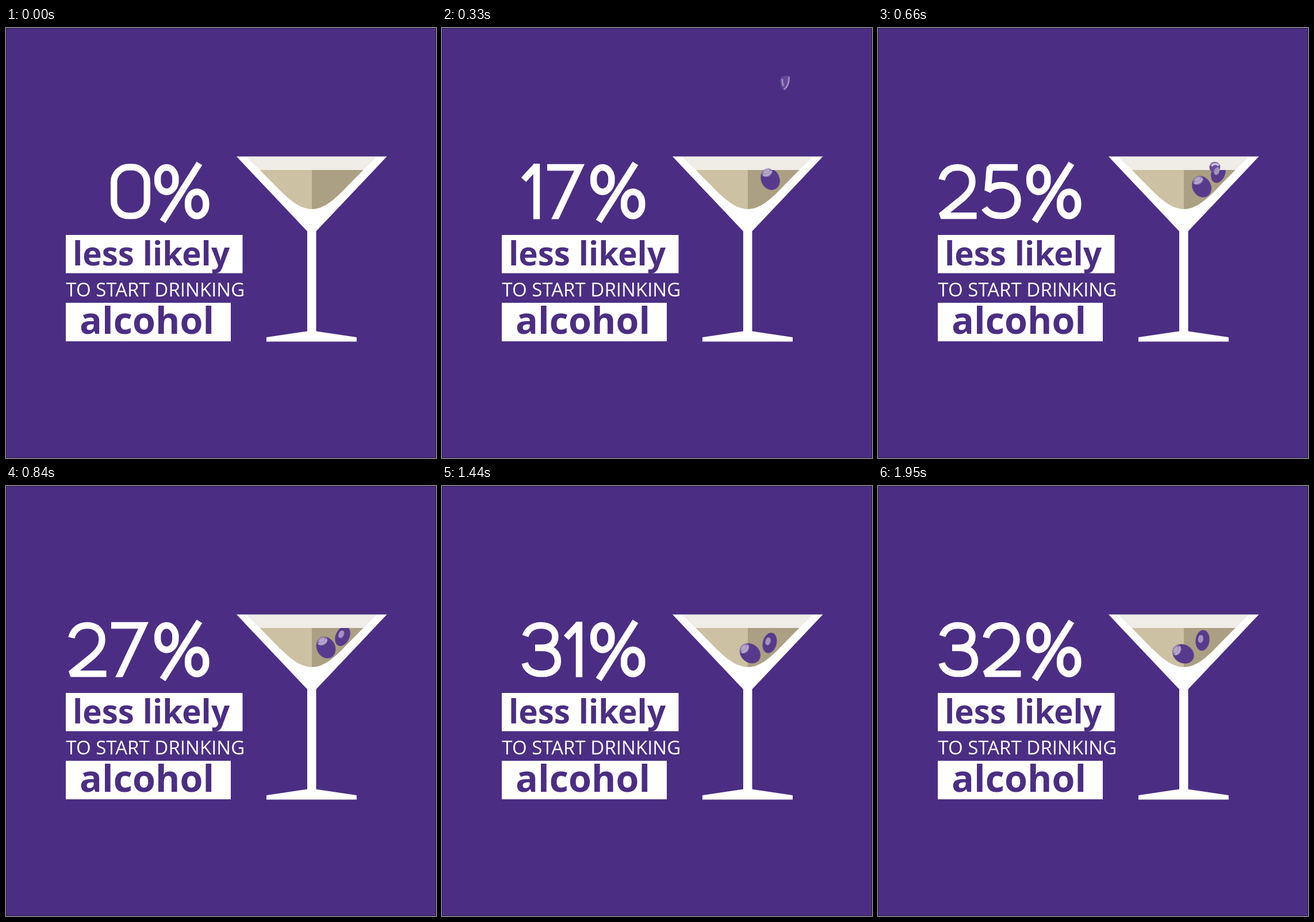
An HTML page for the animation above (2.7 s loop, 748 by 748 pixels).

```html
<!DOCTYPE html>
<html lang="en">
<head>
<meta charset="utf-8">
<title>Less likely to start drinking</title>
<style>
  html, body { margin: 0; width: 100%; height: 100%; overflow: hidden; background: #4b2e83; }
  svg { display: block; width: 100%; height: 100%; }
  text { font-family: "Open Sans", "Noto Sans", sans-serif; }
  .bold { font-weight: 700; fill: #4b2e83; }
  .figure { fill: none; stroke: #fff; stroke-width: 11.4; stroke-linejoin: bevel; }
  .miter { stroke-linejoin: miter; }

  /* Paused: the script's clock --t (ms) picks the pose. */
  .front, .back, .falling, .dip, .dot {
    animation: 2700ms linear calc(var(--t) * -1ms) infinite paused;
  }
  .front { animation-name: front; }
  .back { animation-name: back; }
  .falling { animation-name: falling; }
  .dip { animation-name: dip; }
  .dot { animation-name: dot; }

  @keyframes front {
    0% { transform: translate(583px, -28px) rotate(-15deg); }
    6.667% { transform: translate(580px, 172px) rotate(-24deg); }
    12.222% { transform: translate(571px, 263px) rotate(-26deg); }
    24.444% { transform: translate(563px, 276px) rotate(-30deg); }
    38.889% { transform: translate(549px, 287px) rotate(-27deg); }
    53.333% { transform: translate(536px, 291px) rotate(-50deg); }
    62% { transform: translate(532.5px, 292px) rotate(-57deg); }
    72.222%, 100% { transform: translate(531px, 292px) rotate(-61deg); }
  }
  @keyframes back {
    0% { transform: translate(599px, -90px) rotate(4deg); }
    6.667% { transform: translate(598px, 12px) rotate(6deg); }
    12.222% { transform: translate(596px, 95px) rotate(8deg); }
    20.56% { transform: translate(596px, 217px) rotate(18deg); }
    24.444% { transform: translate(592px, 252px) rotate(20deg); }
    38.889% { transform: translate(578px, 272px) rotate(30deg); }
    53.333% { transform: translate(570px, 273px) rotate(15deg); }
    62% { transform: translate(566.5px, 270.5px) rotate(10deg); }
    72.222%, 100% { transform: translate(564.5px, 268.5px) rotate(7deg); }
  }
  @keyframes falling { 0%, 21% { opacity: 1; } 23.5%, 100% { opacity: 0; } }
  @keyframes dip { 0%, 21% { opacity: 0; } 23.5%, 25% { opacity: 1; } 30%, 100% { opacity: 0; } }
  @keyframes dot { 0%, 21% { opacity: 0; } 24%, 100% { opacity: 1; } }
</style>
</head>
<body>
<svg viewBox="0 0 748 748">
  <defs>
    <clipPath id="line"><rect x="80" y="236" width="300" height="96.6"/></clipPath>
    <clipPath id="liquid"><rect x="400" y="247" width="270" height="80"/></clipPath>
  </defs>
  <rect width="748" height="748" fill="#4b2e83"/>

  <g id="count" class="figure" role="img" clip-path="url(#line)"></g>
  <g class="figure">
    <rect x="263.7" y="242.5" width="31.2" height="42.5" rx="15.6" ry="19"/>
    <rect x="316.6" y="285" width="31.2" height="42" rx="15.6" ry="19"/>
    <path d="M336.5 235.5L272.5 336.5"/>
  </g>

  <rect x="104" y="360" width="307.5" height="66.5" fill="#fff"/>
  <text class="bold" x="116" y="413" font-size="56.6">less likely</text>
  <text x="104.3" y="466.5" font-size="33" fill="#fff">TO START DRINKING</text>
  <rect x="104" y="478" width="287" height="67" fill="#fff"/>
  <text class="bold" x="128" y="531.5" font-size="64.6">alcohol</text>

  <path fill="#fff" d="M401 223.6H662.5L539.5 353.6V527.5L610 538V545.5H453V538L524 527.5V353.6Z"/>
  <path fill="#f0ece6" d="M418 224H645L621.5 247H441.5Z"/>
  <path fill="#cdc1a3" d="M441.5 247H532V315C511 315 493 299 471 277Z"/>
  <path fill="#aba083" d="M621.5 247H532V315C553 315 571 299 592 277Z"/>

  <g clip-path="url(#liquid)">
    <g class="back"><ellipse rx="12" ry="18" fill="#573a8c"/></g>
    <g class="front"><ellipse rx="16" ry="19.5" fill="#573a8c"/></g>
  </g>
  <g class="back">
    <g class="falling">
      <path d="M7 -13C10 -2 7 8 1 14C-6 9 -9 1 -8 -8Q-2 -13 7 -13Z" fill="#63479a"/>
      <path d="M6 -11C8 -2 6 6 1 12M-5 -6Q-4 2 -1 6" fill="none" stroke="#a594c2" stroke-width="2.5"/>
    </g>
    <g class="dip">
      <circle cx="-9" cy="-7" r="9.5" fill="#6a4c9a"/>
      <path d="M-15 -7A7 7 0 0 1 -4 -12" fill="none" stroke="#cfc5dd" stroke-width="3.5"/>
    </g>
    <ellipse class="dot" cx="-3.5" cy="-2" rx="4.6" ry="7" fill="#a392bd"/>
  </g>
  <g class="front">
    <ellipse cy="-12.5" rx="9.5" ry="7" fill="#8f7bb0"/>
    <path d="M-8 -12Q0 -5 8 -12" fill="none" stroke="#c9bfd6" stroke-width="1.8"/>
    <ellipse cy="-14.5" rx="6" ry="4" fill="#b3a4c9"/>
  </g>

  <rect x=".5" y=".5" width="747" height="747" fill="none" stroke="#2a1a4c"/>
</svg>

<script>
const LOOP = 2700, STEP = 30, RIGHT = 254;

// Rounded box outline, used by the closed figures.
const ring = (x, y, w, h, r) =>
  `M${x + r} ${y}h${w - 2 * r}a${r} ${r} 0 0 1 ${r} ${r}v${h - 2 * r}a${r} ${r} 0 0 1 ${-r} ${r}` +
  `h${2 * r - w}a${r} ${r} 0 0 1 ${-r} ${-r}v${2 * r - h}a${r} ${r} 0 0 1 ${r} ${-r}z`;

// Each figure: advance width and centre line.
const figures = [
  [78, ring(11.7, 242, 57.6, 85, 26)],
  [44, 'M6 264L28 240M28.5 236V334'],
  [77, 'M11 264C14 250 25 242.5 38 242.5C55 242.5 64 253 64 267C64 280 57 287 47 296.5L9.5 326.8H71.5'],
  [77, 'M12 261C16 249 26 242.5 39 242.5C55 242.5 64 251 64 262C64 275 54 281.5 40 281.5H29' +
       'M40 281.5C58 281.5 68.5 289 68.5 304.5C68.5 319 57 326.8 40 326.8C25 326.8 14 320 11 308'],
  [79, 'M56 334V241L9 307H75'],
  [77, 'M66 242.5H17.5L14 283C19 277 27 273.5 38 273.5C55 273.5 66 284 66 299.5' +
       'C66 316 54 326.8 37 326.8C24 326.8 14 322 8 313'],
  [79, ring(9.7, 277, 58.6, 49.8, 24) + 'M9.7 302V269C9.7 251 20 242.5 37 242.5H61'],
  [74, 'M3 242.5H59L13 340'],
  [79, ring(13.5, 242.3, 52, 39, 19) + ring(9, 281.3, 60, 45.5, 22)],
  [79, ring(9.7, 242.3, 58.6, 49.8, 24) + 'M68.3 267V300C68.3 318 58 326.8 41 326.8H17']
];

// Time and value of the easing counter.
const curve = [[0, 0], [60, 1.6], [180, 8.5], [330, 17.3], [450, 21.3],
  [660, 25.5], [1050, 29.4], [1440, 31.4], [1590, 32]];

function valueAt(t) {
  const i = curve.findIndex(p => p[0] > t);
  if (i < 0) return 32;
  const [t0, v0] = curve[i - 1], [t1, v1] = curve[i];
  return Math.floor(v0 + (v1 - v0) * (t - t0) / (t1 - t0));
}

const count = document.getElementById('count');
let shown = -1;

function showCount(n) {
  if (n === shown) return;
  shown = n;
  let x = RIGHT, paths = '';
  for (const c of [...String(n)].reverse()) {
    const [advance, d] = figures[c];
    x -= advance;
    paths += `<path class="${c === '7' ? 'miter' : ''}" transform="translate(${x})" d="${d}"/>`;
  }
  count.innerHTML = paths;
  count.setAttribute('aria-label', n + '%');
}

const start = performance.now();

function draw() {
  const t = Math.floor(((performance.now() - start) % LOOP) / STEP) * STEP;
  document.documentElement.style.setProperty('--t', t);
  showCount(valueAt(t));
  requestAnimationFrame(draw);
}
draw();
</script>
</body>
</html>
```
